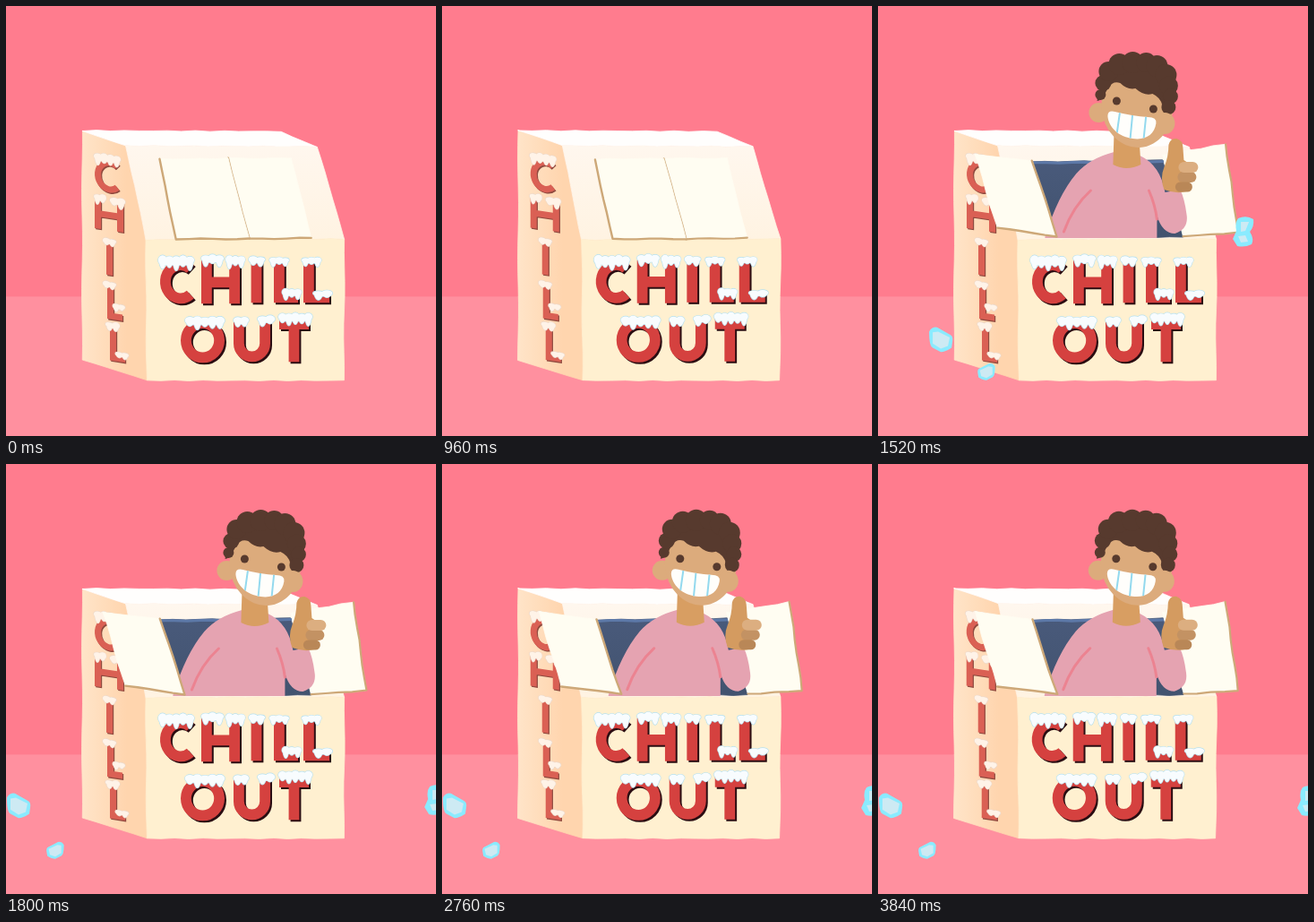
These frames come from a looping animation (480x480 px, 3.96 s). An HTML page with a canvas:

```html
<!DOCTYPE html>
<html>
<head>
<meta charset="utf-8">
<title>Chill out</title>
<style>
  html, body { margin: 0; width: 100%; height: 100%; overflow: hidden; background: #ff7c8e; }
  canvas { display: block; width: 480px; height: 480px; }
</style>
</head>
<body>
<canvas id="stage" width="480" height="480"></canvas>
<script>
const ctx = document.getElementById('stage').getContext('2d');
const LOOP = 3960, OPEN = 1040, BURST = 1150;
const SKIN = '#dcab7c', NECK = '#d89e62', HAIR = '#573a2e', TAN = '#cda878', CREAM = '#fffdf2';
let boil = 0;

const clamp = v => Math.max(0, Math.min(1, v));
const mix = (a, b, k) => a + (b - a) * k;
const mixPoint = (a, b, k) => [mix(a[0], b[0], k), mix(a[1], b[1], k)];
const wobble = (x, y) => [
  x + 0.5 * Math.sin(x * 0.31 + y * 0.73 + boil * 2.1),
  y + 0.5 * Math.sin(x * 0.57 - y * 0.29 + boil * 2.1)
];

// Hand-drawn edge: shared edges get the same wobble, so faces stay joined.
function edge(points, closed) {
  ctx.beginPath();
  const count = points.length - (closed ? 0 : 1);
  for (let i = 0; i < count; i++) {
    const a = points[i], b = points[(i + 1) % points.length];
    const parts = Math.ceil(Math.hypot(b[0] - a[0], b[1] - a[1]) / 16);
    for (let j = 0; j <= parts; j++) ctx.lineTo(...wobble(...mixPoint(a, b, j / parts)));
  }
  if (closed) ctx.closePath();
}

function face(points, fill) {
  edge(points, true);
  ctx.fillStyle = ctx.strokeStyle = fill;
  ctx.lineWidth = 0.8;
  ctx.lineJoin = 'round';
  ctx.fill();
  ctx.stroke();
}

function line(points, color, width) {
  edge(points, false);
  ctx.strokeStyle = color;
  ctx.lineWidth = width;
  ctx.lineJoin = ctx.lineCap = 'round';
  ctx.stroke();
}

function gradient(x0, y0, x1, y1, from, to) {
  const g = ctx.createLinearGradient(x0, y0, x1, y1);
  g.addColorStop(0, from);
  g.addColorStop(1, to);
  return g;
}

function letterPath(ch, x, y, w, h, s) {
  const p = new Path2D();
  const l = x + s / 2, r = x + w - s / 2, t = y + s / 2, b = y + h - s / 2;
  const cx = x + w / 2, cy = y + h / 2;
  const seg = (x0, y0, x1, y1) => { p.moveTo(x0, y0); p.lineTo(x1, y1); };
  if (ch === 'C') {
    p.ellipse(x + w * 0.62, cy, w * 0.62 - s / 2, (h - s) / 2, 0, Math.PI * 0.28, Math.PI * 1.72);
  } else if (ch === 'O') {
    p.ellipse(cx, cy, (w - s) / 2, (h - s) / 2, 0, 0, Math.PI * 2);
  } else if (ch === 'H') {
    seg(l, y, l, y + h);
    seg(r, y, r, y + h);
    seg(l, cy, r, cy);
  } else if (ch === 'I') {
    seg(cx, y, cx, y + h);
  } else if (ch === 'L') {
    seg(l, y, l, b);
    p.lineTo(x + w, b);
  } else if (ch === 'T') {
    seg(x, t, x + w, t);
    seg(cx, y, cx, y + h);
  } else if (ch === 'U') {
    const rad = (r - l) / 2;
    seg(l, y, l, b - rad);
    p.ellipse(cx, b - rad, rad, rad, 0, Math.PI, 0, true);
    p.lineTo(r, y);
  }
  return p;
}

function letter(spec, stroke, color, shadow, offset) {
  const path = letterPath(...spec, stroke);
  ctx.lineWidth = stroke;
  ctx.lineCap = 'butt';
  ctx.lineJoin = 'miter';
  ctx.save();
  ctx.translate(offset, offset);
  ctx.strokeStyle = shadow;
  ctx.stroke(path);
  ctx.restore();
  ctx.strokeStyle = color;
  ctx.stroke(path);
}

function snow(x, y, w, h, fill = '#f8fcfe', rim = '#b4e0f0') {
  const p = new Path2D(), n = Math.max(2, Math.round(w / 8)), gap = w / n;
  p.roundRect(x, y + h * 0.18, w, h * 0.5, h * 0.24);
  for (let i = 0; i < n; i++) {
    const cx = x + gap * (i + 0.5), ry = h * (0.3 + 0.05 * Math.sin(i * 2.3 + x));
    p.moveTo(cx + gap * 0.65, y + h * 0.34);
    p.ellipse(cx, y + h * 0.34, gap * 0.65, ry, 0, 0, Math.PI * 2);
    const tip = y + h * (0.95 + 0.15 * Math.sin(i * 2.6 + x * 0.9));
    p.moveTo(cx + gap * 0.5, y + h * 0.5);
    p.quadraticCurveTo(cx + gap * 0.3, tip, cx, tip);
    p.quadraticCurveTo(cx - gap * 0.3, tip, cx - gap * 0.5, y + h * 0.5);
    p.closePath();
  }
  ctx.strokeStyle = rim;
  ctx.lineWidth = 1.2;
  ctx.stroke(p);
  ctx.fillStyle = fill;
  ctx.fill(p);
}

const FRONT_LETTERS = [
  ['C', 172, 283, 37, 49], ['H', 218, 284, 43, 48], ['I', 273, 285, 13, 46],
  ['L', 299, 285, 27, 46], ['L', 332, 285, 29, 46],
  ['O', 195, 348, 49, 50], ['U', 254, 351, 41, 46], ['T', 305, 349, 33, 48]
];
const FRONT_SNOW = [
  [171, 278, 38, 16], [219, 277, 23, 13], [246, 278, 20, 14], [272, 279, 16, 11],
  [295, 280, 20, 10], [309, 315, 20, 12], [331, 280, 20, 10], [344, 317, 19, 10],
  [201, 346, 42, 14], [255, 346, 15, 13], [282, 345, 17, 12], [305, 342, 36, 14]
];
const SIDE_LETTERS = [
  ['C', 99, 171, 27, 37], ['H', 99, 216, 32, 34], ['I', 111, 262, 9, 38],
  ['L', 113, 311, 17, 38], ['L', 116, 357, 17, 38]
];
const SIDE_SNOW = [
  [99, 165, 28, 13], [99, 211, 12, 11], [117, 212, 15, 12], [109, 259, 13, 9],
  [109, 307, 13, 9], [120, 331, 12, 8], [112, 352, 14, 10], [123, 384, 13, 8]
];

function drawBox() {
  const back = [85, 139], backRight = [307, 140], ridge = [134, 156], ridgeRight = [347, 157];
  const lip = [156, 261], lipRight = [378, 260], foot = [157, 418], footRight = [377, 418];
  face([back, ridge, lip, foot, [85, 395]], gradient(85, 0, 135, 0, '#ffe4c8', '#ffd5ae'));
  face([back, backRight, ridgeRight, ridge], '#fffefd');
  face([ridge, ridgeRight, lipRight, lip], gradient(0, 157, 0, 261, '#fff7ee', '#fff3e2'));
  face([lip, lipRight, footRight, foot], '#fff0d0');

  ctx.save();
  ctx.translate(0.3 * Math.sin(boil * 2.1), 0.3 * Math.cos(boil * 2.1));
  FRONT_LETTERS.forEach(spec => letter(spec, 11.8, '#d5413f', '#2b0d12', 2));
  FRONT_SNOW.forEach(s => snow(...s));
  ctx.transform(1, 0.15, 0, 1, 0, -0.15 * 115);
  SIDE_LETTERS.forEach(spec => letter(spec, 7, '#da6054', '#8f4a3f', 1.2));
  SIDE_SNOW.forEach(s => snow(...s, '#fff3e8', '#ecd8ca'));
  ctx.restore();
}

function flap(hinge, shut, open, k) {
  const lift = 45 * Math.sin(Math.PI * k);
  const free = shut.map((p, i) => {
    const [x, y] = mixPoint(p, open[i], k);
    return [x, y - lift];
  });
  const base = hinge.shut.map((p, i) => mixPoint(p, hinge.open[i], k));
  face([base[0], free[0], free[1], base[1]], CREAM);
  return { base, free };
}

function leftFlap(k) {
  const { base, free } = flap(
    { shut: [[171, 171], [190, 260]], open: [[172, 173], [200, 257]] },
    [[248, 170], [272, 260]], [[108, 165], [133, 248]], k);
  line([...base, free[1]], TAN, 2.4);
}

function rightFlap(k) {
  const { base, free } = flap(
    { shut: [[318, 170], [341, 259]], open: [[318, 166], [341, 257]] },
    [[248, 170], [272, 260]], [[388, 154], [402, 253]], k);
  line([...free, base[1]], TAN, 2.2);
}

function shape(path, color) {
  ctx.fillStyle = color;
  ctx.fill(new Path2D(path));
}

function disc(x, y, rx, ry, color, turn = 0) {
  ctx.beginPath();
  ctx.ellipse(x, y, rx, ry, turn, 0, Math.PI * 2);
  ctx.fillStyle = color;
  ctx.fill();
}

function stroke(path, color, width) {
  ctx.strokeStyle = color;
  ctx.lineWidth = width;
  ctx.lineCap = 'round';
  ctx.stroke(new Path2D(path));
}

function drawMouth() {
  ctx.save();
  const grin = new Path2D('M256 123Q256 116 264 118Q284 123 301 124Q311 124 310 131' +
    'C308 144 298 150 284 148C268 146 257 135 256 123Z');
  ctx.fillStyle = '#fffefb';
  ctx.fill(grin);
  ctx.clip(grin);
  stroke('M270 116L266 144M284 118L281 150M299 121L296 150', '#93d9ee', 2);
  ctx.restore();
}

function drawHead() {
  disc(246, 119, 11, 11, SKIN);
  disc(289, 111, 40, 47, SKIN, -0.06);
  shape('M244 106C251 106 253 96 257 91Q262 83 270 86Q278 94 287 92Q297 101 306 98' +
    'Q315 102 317 111Q319 119 324 122L332 95L322 68L285 53L254 70Z', HAIR);
  const curls = [
    [248, 99, 6], [251, 86, 9], [257, 73, 11], [269, 65, 12], [284, 63, 12], [299, 63, 11],
    [311, 67, 12], [321, 77, 12], [324, 89, 10.5], [326, 101, 8.5], [324, 113, 8]
  ];
  curls.forEach(([x, y, r]) => disc(x, y, r, r, HAIR));
  disc(320, 131, 11, 12, SKIN);
  disc(266, 106, 4.5, 4.5, HAIR);
  disc(307, 115, 4.5, 4.5, HAIR);
  drawMouth();
}

function drawHand() {
  shape('M324 155Q326 147 333 148Q340 150 340 158L341 172L350 178L344 207Q332 210 319 205' +
    'Q314 192 319 180Q324 168 324 155Z', '#d49b60');
  stroke('M340 191H349', '#c39263', 12);
  stroke('M337 202H345', '#b98757', 11);
  stroke('M341 180H351', '#dcae80', 12);
}

function drawMan(drop, sway) {
  ctx.save();
  ctx.beginPath();
  ctx.rect(0, 0, 480, 259);
  ctx.clip();
  ctx.translate(sway, drop);
  shape('M263 163Q236 170 221 187Q200 212 186 258V520H311V234Q317 254 331 254Q347 249 344 232' +
    'Q342 216 337 205L320 208Q315 178 292 167Z', '#e5a3b1');
  stroke('M207 252Q217 224 237 206M302 206Q309 222 311 238', '#ec8391', 3);
  shape('M263 145L262 177Q277 185 293 177L291 145Z', NECK);
  drawHead();
  drawHand();
  ctx.restore();
}

const CHUNK = ['M-13-9Q-10-15-4-14L11-5Q14-3 13 3L12 10Q5 15 0 15L-9 10Q-13 8-13-9Z',
  'M-9-8L-3-9L10-2L8 8L0 11L-9 5Z'];
const NOTCHED = ['M-6-15Q3-19 11-14Q12-6 7 0Q12 8 9 14Q1 18-7 16L-12 8L-8-1Q-10-10-6-15Z',
  'M-3-11L6-11L2-1L-3 0ZM-6 5L2 4L5 11L-3 12Z'];

// Motion is measured from the moment 1240 ms: position, speed, gravity, resting place.
const CUBES = [
  { at: [165, 153], v: [-0.339, -0.338], g: 0.004, fly: 285, rest: [14, 381], size: [1, 0.95], look: CHUNK },
  { at: [202, 60], v: [-0.289, -0.7], g: 0.00694, fly: 287, rest: [55, 431], size: [-0.74, 0.65], look: CHUNK },
  { at: [293, 150], v: [0.411, -0.756], g: 0.004, fly: 350, rest: [480, 376], size: [1, 1], look: NOTCHED }
];

function drawCube({ at, v, g, fly, rest, size, look }, t) {
  const s = t - 1240, air = Math.min(s, fly);
  let x = at[0] + v[0] * air, y = at[1] + v[1] * air + g * air * air;
  if (s > fly) {
    const u = clamp((s - fly) / 230);
    x = mix(x, rest[0], 1 - (1 - u) ** 1.6);
    y = rest[1] - 20 * Math.abs(Math.sin(u * Math.PI * 2)) * (1 - u);
  }
  ctx.save();
  ctx.translate(x, y);
  ctx.rotate(Math.sin(Math.PI * Math.min(s, 280) / 280) * 0.9);
  ctx.scale(...size);
  shape(look[0], '#8aebff');
  shape(look[1], '#cdeaf3');
  ctx.restore();
}

function draw(now) {
  const t = Math.floor((now % LOOP) / 40) * 40;
  boil = Math.floor(t / 120) % 3;
  ctx.fillStyle = '#ff7c8e';
  ctx.fillRect(0, 0, 480, 324.5);
  ctx.fillStyle = '#ff909f';
  ctx.fillRect(0, 324.5, 480, 156);
  drawBox();

  const k = t < OPEN ? 0 : clamp((t - OPEN + 40) / 160);
  if (k > 0) {
    face([[171, 174], [318, 172], [341, 258], [200, 258]], gradient(0, 172, 0, 259, '#495a7b', '#42536f'));
    line([[173, 175], [318, 174]], '#5d79a8', 3);
  }
  rightFlap(k);
  if (t >= OPEN + 40) {
    const rise = clamp((t - OPEN) / 150);
    const settle = clamp((t - OPEN - 150) / 50);
    const lean = 2.5 * (1 - clamp((t - OPEN - 200) / 80));
    const drop = mix(mix(215, -19, 1 - (1 - rise) ** 2), 0, settle);
    drawMan(drop + 0.3 * Math.sin(boil * 2.1), lean + 0.4 * Math.cos(boil * 2.1));
  }
  leftFlap(k);
  if (t >= BURST) CUBES.forEach(cube => drawCube(cube, t));
}

const start = performance.now();
function tick() {
  draw(performance.now() - start);
  requestAnimationFrame(tick);
}
tick();
</script>
</body>
</html>
```
